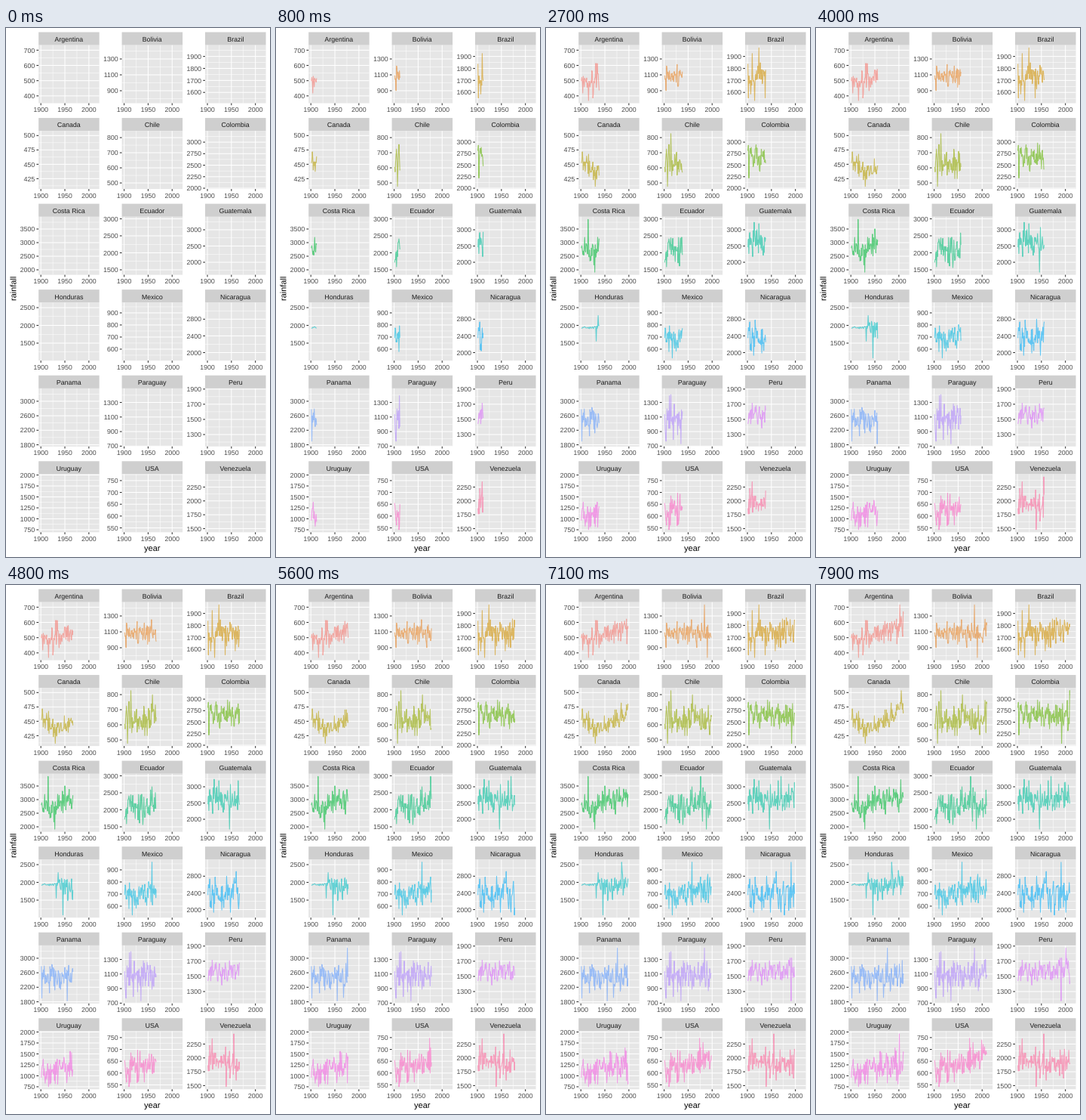
Animation, 350 px wide and 700 px high, one loop 8000 ms. Source, as a matplotlib script:

```python
import numpy as np
import matplotlib.pyplot as plt
from matplotlib.animation import FuncAnimation
from matplotlib.collections import LineCollection
from matplotlib.patches import PathPatch, Rectangle
from matplotlib.textpath import TextPath
from matplotlib.transforms import Affine2D

W, H, DPI = 350, 700, 100
PX = 72 / DPI                      # points per pixel
FRAMES, STEP_MS = 80, 100
YEARS_PER_FRAME = 115 / 84
PANEL_W, PANEL_H, STRIP_H = 80.5, 76.8, 17.2
YEARS = np.arange(1901, 2017)
X_LO, X_HI = 1895.25, 2021.75
EXPAND = 1 / 22                    # share of the axis left free at each end

plt.rcParams.update({"font.family": "Liberation Sans", "path.simplify": False})

fig = plt.figure(figsize=(W / DPI, H / DPI), dpi=DPI, facecolor="white")
ax = fig.add_axes([0, 0, 1, 1])
ax.set(xlim=(0, W), ylim=(H, 0))
ax.axis("off")

minor, major, ticks, series = [], [], [], []


def hcl(hue, c=100, l=65):
    """Polar LUV colour as an sRGB triple."""
    a = np.radians(hue)
    y = ((l + 16) / 116) ** 3
    u = c * np.cos(a) / (13 * l) + 0.1978398
    v = c * np.sin(a) / (13 * l) + 0.4683363
    x = 9 * y * u / (4 * v)
    z = -x / 3 - 5 * y + 3 * y / v
    rgb = np.array([
        3.240479 * x - 1.537150 * y - 0.498535 * z,
        -0.969256 * x + 1.875992 * y + 0.041556 * z,
        0.055648 * x - 0.204043 * y + 1.057311 * z,
    ])
    rgb = np.clip(rgb, 0, 1)
    return np.where(rgb > 0.00304, 1.055 * rgb ** (1 / 2.4) - 0.055, 12.92 * rgb)


def text(x, y, s, size=8.8, color="#4D4D4D", align=0.5, angle=0):
    """Unhinted text on a whole-pixel baseline; align 0 is left, 1 is right."""
    path = TextPath((0, 0), s, size=size)
    width = path.get_extents().x1 + 0.04 * size
    place = (Affine2D().translate(-align * width, 0).scale(1, -1)
             .rotate_deg(angle).translate(x, round(y)))
    ax.add_patch(PathPatch(place.transform_path(path), fc=color, lw=0,
                           snap=False, zorder=6))


def box(x, y, w, h, color):
    ax.add_patch(Rectangle((x, y), w, h, fc=color, lw=0, snap=False, zorder=1))


def strokes(segs, width, color, z):
    ax.add_collection(LineCollection(
        segs, linewidths=width * PX, colors=color, zorder=z, snap=False))


def rainfall(seed, lims, trend, dry, wet, vary, calm_until):
    """Yearly noise around a trend, touching both extremes once."""
    lo, hi = lims
    pad = EXPAND * (hi - lo)
    rng = np.random.default_rng(seed)
    mean = np.interp(YEARS, np.linspace(1901, 2016, len(trend)), trend)
    spread = vary * (hi - lo) * np.where(YEARS < calm_until, 0.1, 1)
    vals = mean + spread * rng.standard_normal(len(YEARS))
    vals = np.clip(vals, lo + 2 * pad, hi - 2 * pad)
    vals[YEARS == dry] = lo + pad
    vals[YEARS == wet] = hi - pad
    return vals


def panel(name, first, step, lims, trend, dry, wet, vary=0.13, calm_until=0):
    i = len(series)
    row, col = divmod(i, 3)
    left, top = 43.2 + 110.4 * col, 22.7 + 113.55 * row
    right, bottom = left + PANEL_W, top + PANEL_H
    lo, hi = lims

    def px(year):
        return left + (year - X_LO) / (X_HI - X_LO) * PANEL_W

    def py(value):
        return bottom - (value - lo) / (hi - lo) * PANEL_H

    box(left, top - STRIP_H, PANEL_W, STRIP_H, "#CFCFCF")
    box(left, top, PANEL_W, PANEL_H, "#E6E6E6")
    text((left + right) / 2, top - 4.8, name, color="#1A1A1A")

    for v in np.arange(first - step / 2, hi, step):
        if v > lo:
            minor.append([(left, py(v)), (right, py(v))])
    for v in np.arange(first, hi, step):
        y = py(v)
        major.append([(left, y), (right, y)])
        ticks.append([(left - 2.75, y), (left, y)])
        text(left - 4.95, y + 3.15, str(int(v)), align=1)
    for year in (1925, 1975):
        minor.append([(px(year), top), (px(year), bottom)])
    for year in (1900, 1950, 2000):
        x = px(year)
        major.append([(x, top), (x, bottom)])
        ticks.append([(x, bottom), (x, bottom + 2.75)])
        text(x, bottom + 11.5, str(year))

    line, = ax.plot([], [], color=hcl(15 + 20 * i), alpha=0.58, lw=1.07 * PX, zorder=4,
                    solid_joinstyle="round", solid_capstyle="butt")
    vals = rainfall(i + 1, lims, trend, dry, wet, vary, calm_until)
    series.append((line, px, py, vals))


panel("Argentina", 400, 100, (352, 733), (480, 590), dry=1916, wet=2002)
panel("Bolivia", 900, 200, (743, 1474), (1080, 1080), dry=1990, wet=1984, vary=0.1)
panel("Brazil", 1600, 100, (1510, 1994), (1710, 1780), dry=1915, wet=1924)
panel("Canada", 425, 25, (407, 508), (458, 437, 443, 462, 482), dry=1930, wet=2005, vary=0.09)
panel("Chile", 500, 100, (460, 844), (655, 645), dry=1907, wet=1914, vary=0.16)
panel("Colombia", 2000, 250, (1983, 3243), (2640, 2680), dry=1992, wet=2009)
panel("Costa Rica", 2000, 500, (1816, 3950), (2800, 3150), dry=1929, wet=1915)
panel("Ecuador", 1500, 500, (1353, 3060), (2100, 2130), dry=1988, wet=1976)
panel("Guatemala", 2000, 500, (1614, 3400), (2650, 2620), dry=1946, wet=1970)
panel("Honduras", 1500, 500, (1007, 2642), (1940, 1970), dry=1946, wet=1985, calm_until=1932)
panel("Mexico", 600, 100, (505, 985), (690, 750), dry=1917, wet=1958)
panel("Nicaragua", 2000, 400, (1807, 3198), (2350, 2410), dry=1977, wet=1991, vary=0.17)
panel("Panama", 1800, 400, (1754, 3354), (2400, 2530), dry=1955, wet=1976)
panel("Paraguay", 700, 200, (696, 1493), (1050, 1120), dry=1935, wet=1984, vary=0.16)
panel("Peru", 1300, 200, (1143, 1909), (1550, 1590), dry=1991, wet=2001, vary=0.1)
panel("Uruguay", 750, 250, (693, 2018), (1060, 1270), dry=1916, wet=2001)
panel("USA", 550, 50, (531.5, 777), (620, 675), dry=1910, wet=2014)
panel("Venezuela", 1500, 250, (1434, 2482), (1930, 1920), dry=1939, wet=1955, vary=0.14)

strokes(minor, 0.53, "white", 2)
strokes(major, 1.07, "white", 3)
strokes(ticks, 1.07, "#333333", 5)
text(193.9, 692, "year", size=11, color="black")
text(13.4, 345, "rainfall", size=11, color="black", angle=-90)


def update(k):
    now = 1901 + k * YEARS_PER_FRAME
    years = np.append(YEARS[YEARS < now], now)
    for line, px, py, vals in series:
        line.set_data(px(years), py(np.interp(years, YEARS, vals)))
    return [s[0] for s in series]


anim = FuncAnimation(fig, update, frames=FRAMES, interval=STEP_MS, repeat=True, repeat_delay=0)
plt.show()
```
